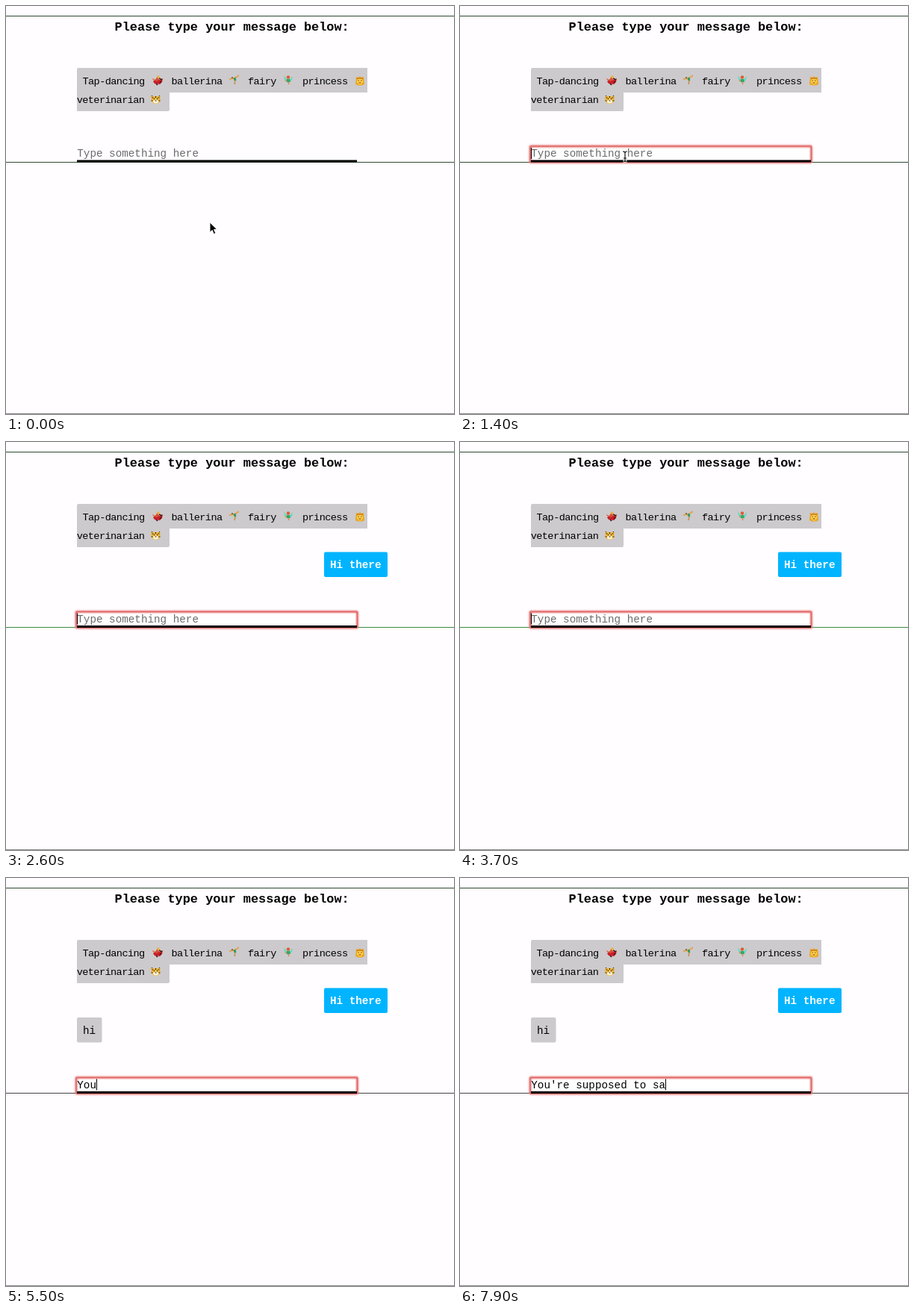
An HTML page that plays this animation: 600x547 px, repeating every 8 s.

```html
<!DOCTYPE html>
<html lang="en">
<head>
<meta charset="utf-8">
<title>Message form</title>
<style>
html, body { margin: 0; width: 100%; height: 100%; overflow: hidden; background: #fffdff; }
svg { display: block; width: 600px; height: 547px; }
text { font: 14.28px "Liberation Mono", "Courier New", monospace; white-space: pre; }
.title { font-size: 16.9px; font-weight: bold; }
.list text { font-size: 13.6px; letter-spacing: -.6px; }
.grey { fill: #cccacd; }
.sent { font-weight: bold; fill: #fff; }
</style>
</head>
<body>
<svg viewBox="0 0 600 547">
  <defs>
    <filter id="glow" x="-5%" y="-50%" width="110%" height="200%"><feGaussianBlur stdDeviation="1"/></filter>
  </defs>
  <rect width="600" height="547" fill="#fffdff"/>
  <path d="M0 13.5H600" stroke="#2f4a32"/>
  <path d="M0 546.5H600" stroke="#8c8c8c"/>
  <text class="title" x="145.5" y="33">Please type your message below:</text>

  <g class="list">
    <path class="grey" d="M97 83H484V116H219V139q0 2-2 2H95V85q0-2 2-2z"/>
    <text x="102.5" y="104.5">Tap-dancing</text>
    <text x="221.5" y="104.5">ballerina</text>
    <text x="324" y="104.5">fairy</text>
    <text x="397" y="104.5">princess</text>
    <text x="94.7" y="130">veterinarian</text>
  </g>

  <g transform="translate(203 100)">
    <path d="M-2-2L3-1 7-3 6 2 3 5-4 4-6 1z" fill="#c8202a"/>
    <path d="M-7-3L-3-1 0-6 2-1-1 1-6-1z" fill="#e0502c"/>
    <circle cx="1" cy="-5" r="1.8" fill="#f2ae3c"/>
    <path d="M2-3L6-1M-2 4L0 6M3 3L5 1" stroke="#3a1a16" stroke-width="1.6"/>
  </g>
  <g transform="translate(306 99)" fill="none" stroke-width="2">
    <path d="M-7-1L0-2 6-6" stroke="#e3a24a"/>
    <path d="M0-3L1 1" stroke="#2f9a62" stroke-width="3"/>
    <path d="M1 1L0 6" stroke="#c9914a" stroke-width="1.6"/>
    <circle cx="-3" cy="-3" r="1" fill="#7a4a20" stroke="none"/>
  </g>
  <g transform="translate(378 99)">
    <path d="M-1 0L-6-6-5 0-2 2zM1 0L6-5 5 1 2 2z" fill="#6ed8c0"/>
    <circle cy="-3.5" r="2.2" fill="#e05a30"/>
    <path d="M-2-1H2L3 3-2 3z" fill="#2fa866"/>
    <path d="M0 3L1 6M-2 0L-4 2" stroke="#d98a4a" stroke-width="1.5"/>
  </g>
  <g transform="translate(474 100)">
    <path d="M-5-5L-2-4 0-6 2-4 5-5 6 5Q0 8-6 5z" fill="#eaa51f"/>
    <ellipse cy="1" rx="4" ry="4.4" fill="#ffd04d"/>
    <path d="M-4-3H4" stroke="#b86a17" stroke-width="1.2"/>
    <path d="M-2.5 0h1.5M1 0h1.5M-1.5 3h3" stroke="#6b3a12"/>
  </g>
  <g transform="translate(200.500 125)">
    <path d="M-6-5L-3-4H3L6-5 6 2Q4 6 0 6T-6 2z" fill="#efb73c"/>
    <ellipse cy="3" rx="3.5" ry="2.5" fill="#fff3d0"/>
    <path d="M-5-2h2M5-2h-2M0-4v2M-6 2h2M6 2h-2M-1 2h2M-5-4v-1M5-4v-1" stroke="#2b2115" stroke-width="1.2"/>
    <path d="M-2.500-.5h1M1.500-.5h1" stroke="#222" stroke-width="1.5"/>
  </g>

  <g id="sent">
    <rect x="426" y="147.500" width="85" height="33.500" rx="2" fill="#00b4ff"/>
    <text class="sent" x="434" y="169">Hi there</text>
  </g>
  <g id="reply">
    <rect class="grey" x="95" y="187" width="33.500" height="33.500" rx="2"/>
    <text x="103" y="208.500">hi</text>
  </g>

  <path id="rule" d="M0 209.500H600"/>
  <g id="field">
    <g id="focus" fill="none">
      <rect x="94" y="188" width="376.500" height="21.500" fill="#fff"/>
      <rect x="94" y="188" width="376.500" height="21.500" rx="1" stroke="#e87a78" stroke-width="3" filter="url(#glow)"/>
      <rect x="94" y="188" width="376.500" height="21.500" rx="1" stroke="#e0696a" stroke-width="1.500"/>
    </g>
    <path d="M95 208H470" stroke="#000" stroke-width="3"/>
    <text id="value" x="95.300" y="202"></text>
    <path id="caret" d="M0 190V205" stroke="#000"/>
  </g>

  <path id="arrow" d="M0 0V13.500L3.200 10.600 5.300 15.700 7.800 14.600 5.600 9.700H9.800z" fill="#000" stroke="#fff"/>
  <g id="beam" fill="none">
    <path d="M-3-7Q0-7 0-5 0-7 3-7M0-5V5M-3 7Q0 7 0 5 0 7 3 7M-2 2H2" stroke="#fff" stroke-width="3"/>
    <path d="M-3-7Q0-7 0-5 0-7 3-7M0-5V5M-3 7Q0 7 0 5 0 7 3 7M-2 2H2" stroke="#111" stroke-width="1.200"/>
  </g>
</svg>
<script>
const LOOP = 8000, STEP = 100, CHAR = 8.57;
const FOCUS = 1100, SENT = 2500, REPLY = 3900;
const el = id => document.getElementById(id);
const show = (id, on) => el(id).setAttribute('visibility', on ? 'visible' : 'hidden');
const move = (id, x, y) => el(id).setAttribute('transform', `translate(${x} ${y})`);

// Each pair is a time and the number of characters typed by then.
const drafts = [
  { text: 'Hi there', keys: [[1500, 0], [2400, 8]] },
  { text: "You're supposed to sa", keys: [[5200, 0], [5500, 3], [6300, 9], [7000, 15], [7900, 21]] }
];

function typed(keys, t) {
  if (t <= keys[0][0]) return 0;
  for (let i = 1; i < keys.length; i++) {
    const [a, m] = keys[i - 1], [b, n] = keys[i];
    if (t <= b) return Math.floor(m + (n - m) * (t - a) / (b - a) + 1e-6);
  }
  return keys[keys.length - 1][1];
}

function drawField(t) {
  const { text, keys } = drafts[t < SENT ? 0 : 1];
  const count = typed(keys, t);
  const blinkStart = t < SENT ? FOCUS : SENT;
  el('value').textContent = count ? text.slice(0, count) : 'Type something here';
  el('value').setAttribute('fill', count ? '#000' : '#6c6c6c');
  show('focus', t >= FOCUS);
  show('caret', t >= FOCUS && (count > 0 || (t - blinkStart) % 1000 < 500));
  move('caret', 95.5 + Math.round(count * CHAR), 0);

  const shift = t < SENT ? 0 : t < REPLY ? 39.5 : 79.5;
  move('field', 0, shift);
  move('rule', 0, Math.round(shift - .5));
  el('rule').setAttribute('stroke', t < SENT ? '#2f4a32' : t < REPLY ? '#3f8a42' : '#444');
}

function drawPointer(t) {
  const p = Math.min(1, Math.max(0, t / 900));
  const ease = p * p * (3 - 2 * p);
  const x = 273 - 52 * ease, y = 290 - 88 * ease;
  const inside = y < 209;
  show('arrow', !inside);
  show('beam', inside && t < 1600);
  move('arrow', x, y);
  move('beam', x, y);
}

function frame(now) {
  const t = Math.floor(now % LOOP / STEP) * STEP;
  show('sent', t >= SENT);
  show('reply', t >= REPLY);
  drawField(t);
  drawPointer(t);
  requestAnimationFrame(frame);
}
frame(0);
</script>
</body>
</html>
```
